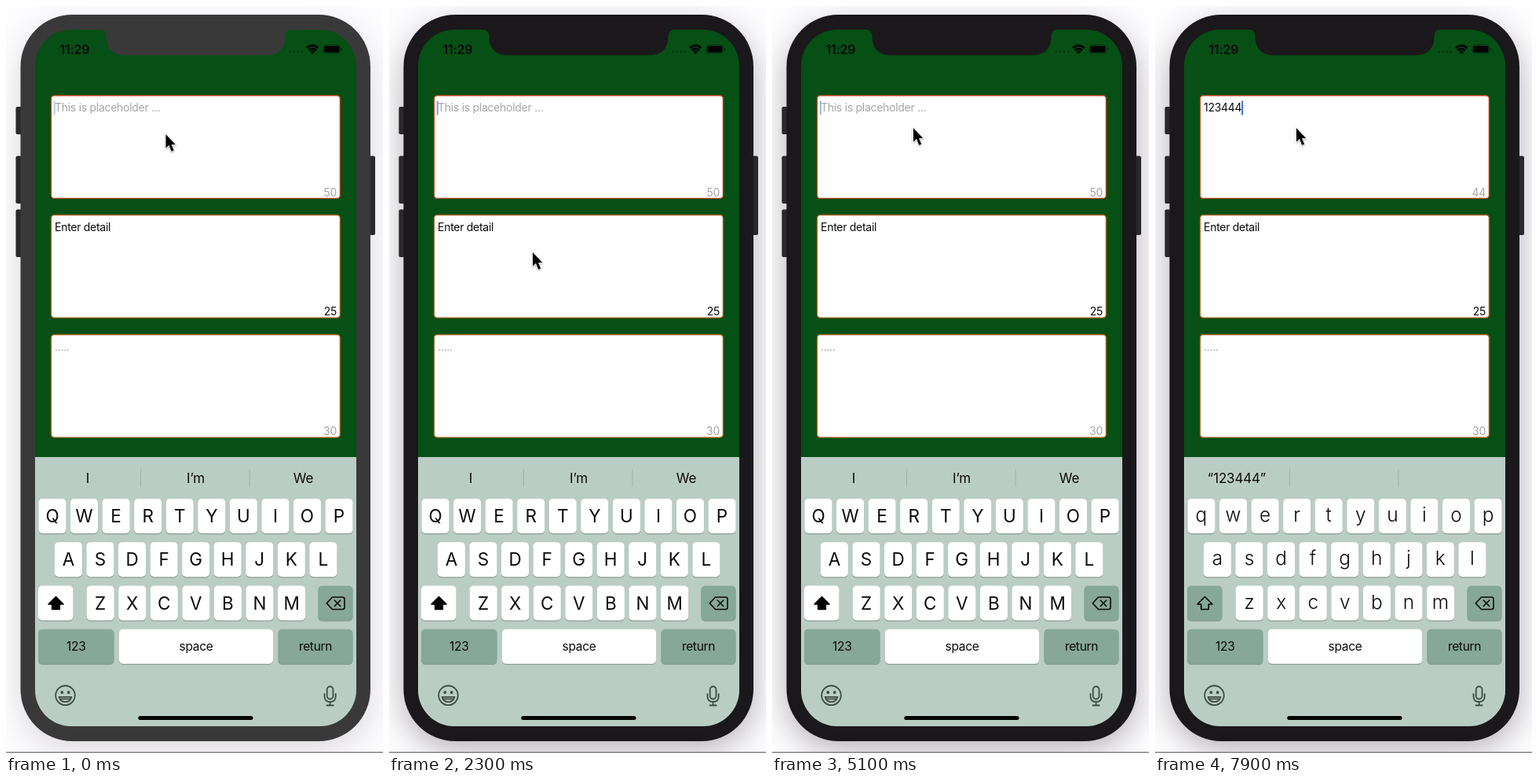
Write an HTML page that moves like this. It is 480x949 px and loops after 8 s.

```html
<!DOCTYPE html>
<html lang="en">
<head>
<meta charset="utf-8">
<title>Text view with placeholder</title>
<style>
html, body { margin: 0; width: 100%; height: 100%; overflow: hidden; background: #fff; }
svg { display: block; width: 100vw; height: 100vh; }
text { font-family: Inter, Roboto, sans-serif; fill: #0b0b0b; }
.small { font-size: 14px; letter-spacing: -.02em; }
.hint { fill: #a6a6a8; }
.mid { text-anchor: middle; }
.end { text-anchor: end; }
.word { font-size: 17px; letter-spacing: -.01em; }
.label { font-size: 15.5px; letter-spacing: -.02em; }
.upper text { font-size: 22.5px; }
.lower text { font-size: 24.5px; font-weight: 300; }
.key { fill: #fff; }
.dark { fill: #86a799; }
.edge { fill: #8a9d94; }
.line { fill: none; stroke: #3f4d47; stroke-width: 1.8; stroke-linecap: round; }
.body { fill: #3a393a; }
.active .body { fill: #1b181b; }
#shadow { opacity: .2; }
.active #shadow { opacity: .42; }
</style>
</head>
<body>
<svg id="stage" viewBox="0 0 480 949" preserveAspectRatio="none">
  <defs>
    <filter id="blur" x="-30%" y="-20%" width="160%" height="140%"><feGaussianBlur stdDeviation="20"/></filter>
  </defs>
  <rect width="480" height="949" fill="#fdfcfe"/>
  <rect id="shadow" x="19" y="26" width="445" height="918" rx="66" fill="#4a4550" filter="url(#blur)"/>
  <rect y="947.5" width="480" height="1.5" fill="#858487"/>

  <g fill="#29282a">
    <rect x="12.5" y="128" width="9" height="35" rx="2"/>
    <rect x="12.5" y="190.5" width="9" height="60.5" rx="2"/>
    <rect x="12.5" y="258.5" width="9" height="60.5" rx="2"/>
    <rect x="461" y="190.5" width="9" height="100.5" rx="2"/>
  </g>
  <rect class="body" x="18.5" y="11" width="445.5" height="923" rx="66"/>
  <rect x="37" y="30" width="409" height="885" rx="46" fill="#064f15"/>
  <path d="M37 573H446V869a46 46 0 0 1-46 46H83a46 46 0 0 1-46-46Z" fill="#bacdc5"/>
  <path class="body" d="M118 29.5H365Q355.500 30 355.500 38.500C355.500 54 347 62.500 332 62.500H151C136 62.500 127.500 54 127.500 38.500Q127.500 30 118 29.500Z"/>

  <text x="68.500" y="60.500" font-size="16" font-weight="600" letter-spacing="-.2">11:29</text>
  <g fill="#073b11">
    <circle cx="362" cy="58" r="1.500"/><circle cx="367" cy="58" r="1.500"/>
    <circle cx="372" cy="58" r="1.500"/><circle cx="377" cy="58" r="1.500"/>
  </g>
  <g fill="none" stroke="#000" stroke-width="2.500">
    <path d="M383.200 53.500Q390.300 46.800 397.400 53.500"/>
    <path d="M385.700 56.500Q390.300 52.300 394.900 56.500"/>
  </g>
  <path d="M387.500 58.200Q390.300 56 393.100 58.200L390.300 61.200Z"/>
  <rect x="403.900" y="49.500" width="21.700" height="10.800" rx="3" fill="none" stroke="#05350e"/>
  <rect x="405.200" y="50.800" width="19.200" height="8.200" rx="1.800"/>
  <path d="M427 53q1.800 2 0 4Z"/>

  <g id="fields"></g>
  <rect id="caret" y="0" width="2" height="18" fill="#3b70d6"/>

  <path d="M171.500 588V611M310 588V611" stroke="#a0b3aa"/>
  <g id="words"></g>
  <g id="keys"></g>
  <g id="caps" class="upper"></g>
  <g id="small" class="lower"></g>

  <path id="shift" d="M63.500 750.500L73 760H68.300V766.500H58.700V760H54Z" stroke="#000" stroke-width="1.600" stroke-linejoin="round"/>
  <g fill="none" stroke="#0b0b0b" stroke-width="1.600" stroke-linejoin="round" stroke-linecap="round">
    <path d="M415.500 751H428.500q2.500 0 2.500 2.500V764q0 2.500-2.500 2.500H415.500L408.300 758.800Z"/>
    <path d="M418.300 755L425.700 762.500M425.700 755L418.300 762.500"/>
  </g>

  <circle class="line" cx="75.500" cy="875.800" r="12.300"/>
  <circle cx="71.300" cy="872" r="1.900" fill="#3f4d47"/>
  <circle cx="79.700" cy="872" r="1.900" fill="#3f4d47"/>
  <path class="line" d="M67.700 877.800H83.300Q82 884.200 75.500 884.200T67.700 877.800ZM69 880.300H82" stroke-width="1.400"/>
  <rect class="line" x="408.700" y="864.500" width="7.800" height="16" rx="3.900"/>
  <path class="line" d="M405.500 874V877Q405.500 884 412.600 884T419.700 877V874M412.600 884V888.500M408.500 888.500H416.700"/>
  <rect x="168.300" y="902" width="146.200" height="5" rx="2.500"/>

  <path id="pointer" d="M0 0V17.500L4 13.800L7.200 21.700L10.200 20.400L7.100 13H12.300Z" stroke="#fff" stroke-width="1.500" paint-order="stroke" style="filter: drop-shadow(0 1.5px 1px #0005)"/>
</svg>
<script>
const $ = id => document.getElementById(id);
const stage = $('stage');

function add(parent, tag, attrs, content = '') {
  const el = document.createElementNS('http://www.w3.org/2000/svg', tag);
  for (const name in attrs) el.setAttribute(name, attrs[name]);
  el.textContent = content;
  parent.append(el);
  return el;
}
const write = (parent, x, y, cls, content) => add(parent, 'text', { x, y, class: cls }, content);

// Text fields
const fieldTops = [114, 265.7, 417.7];
const [first, second, third] = [
  ['This is placeholder ...', '50', '#b5431a', 'hint'],
  ['Enter detail', '25', '#a5611c', ''],
  ['.....', '30', '#a5611c', 'hint']
].map(([content, count, stroke, cls], i) => {
  const y = fieldTops[i];
  add($('fields'), 'rect', { x: 57.4, y: y - .2, width: 368, height: 130.6, rx: 4, fill: '#fffefe', stroke, 'stroke-width': 1.4 });
  return {
    text: write($('fields'), 62, y + 20.2, 'small ' + cls, content),
    count: write($('fields'), 421, y + 127.5, 'small end ' + cls, count)
  };
});

// Keyboard
function addKey(x, y, width, dark) {
  add($('keys'), 'rect', { x, y: y + 1.3, width, height: 44, rx: 5, class: 'edge' });
  return add($('keys'), 'rect', { x, y, width, height: 44, rx: 5, class: dark ? 'dark' : 'key' });
}
const words = [104, 241.5, 378.5].map(x => write($('words'), x, 606, 'word mid', ''));
[['QWERTYUIOP', 59, 626], ['ASDFGHJKL', 79.4, 681.2], ['ZXCVBNM', 120.2, 736.5]].forEach(([row, left, y]) => {
  [...row].forEach((letter, i) => {
    const x = left + i * 40.56;
    addKey(x - 17.5, y, 35, false);
    write($('caps'), x, y + 30, 'mid', letter);
    write($('small'), x, y + 29, 'mid', letter.toLowerCase());
  });
});
const shiftKey = addKey(41, 736.5, 44.5, false);
addKey(397.5, 736.5, 44, true);
[['123', 41, 96.5, true], ['space', 144, 196, false], ['return', 346.5, 95, true]].forEach(([name, x, width, dark]) => {
  addKey(x, 791.7, width, dark);
  write($('keys'), x + width / 2, 818.5, 'label mid', name);
});

// Timeline in ms
const LOOP = 8000, ACTIVATE = 1700, FOCUS_THIRD = 3500, FOCUS_FIRST = 4500;
const typing = [[5600, '1'], [5700, '12'], [6600, '123'], [7100, '1234'], [7400, '12344'], [7600, '123444']];
const route = [
  [0, 203.5, 163], [1400, 203.5, 163], [1700, 183, 313], [2600, 183, 313],
  [3100, 150, 455], [3600, 150, 455], [3900, 156.5, 224], [4300, 180, 155], [LOOP, 180, 155]
];

function pointerAt(t) {
  const i = route.findIndex(stop => stop[0] > t);
  const [a, b] = [route[i - 1], route[i]];
  const k = (t - a[0]) / (b[0] - a[0]);
  const e = k * k * (3 - 2 * k);
  return [a[1] + (b[1] - a[1]) * e, a[2] + (b[2] - a[2]) * e];
}

// Blink: shown, fade out, hidden, fade in
function blink(ms) {
  const p = (ms % 1000) / 1000;
  if (p <= .5) return 1;
  return p < .75 ? Math.max(0, 1 - (p - .5) / .2) : Math.max(0, (p - .8) / .2);
}

function draw(t) {
  const last = typing.filter(step => step[0] <= t).pop();
  const typed = last ? last[1] : '';
  stage.classList.toggle('active', t >= ACTIVATE);

  first.text.textContent = typed || 'This is placeholder ...';
  first.text.classList.toggle('hint', !typed);
  first.count.textContent = 50 - typed.length;
  const offers = typed ? ['“' + typed + '”', '', ''] : ['I', 'I’m', 'We'];
  words.forEach((word, i) => word.textContent = offers[i]);

  $('caps').style.display = typed ? 'none' : '';
  $('small').style.display = typed ? '' : 'none';
  shiftKey.setAttribute('class', typed ? 'dark' : 'key');
  $('shift').setAttribute('fill', typed ? 'none' : '#000');

  const inThird = t >= FOCUS_THIRD && t < FOCUS_FIRST;
  const since = last ? t - last[0] : t >= FOCUS_FIRST ? t - FOCUS_FIRST : inThird ? t - FOCUS_THIRD : t + 630;
  $('caret').setAttribute('x', typed ? 61.8 + first.text.getComputedTextLength() : 60.8);
  $('caret').setAttribute('y', fieldTops[inThird ? 2 : 0] + 6.5);
  $('caret').setAttribute('opacity', blink(since));

  $('pointer').setAttribute('transform', `translate(${pointerAt(t)})`);
}

const start = performance.now();
function tick() {
  const t = (performance.now() - start) % LOOP;
  draw(Math.floor(t / 100) * 100);
  requestAnimationFrame(tick);
}
tick();
</script>
</body>
</html>
```
